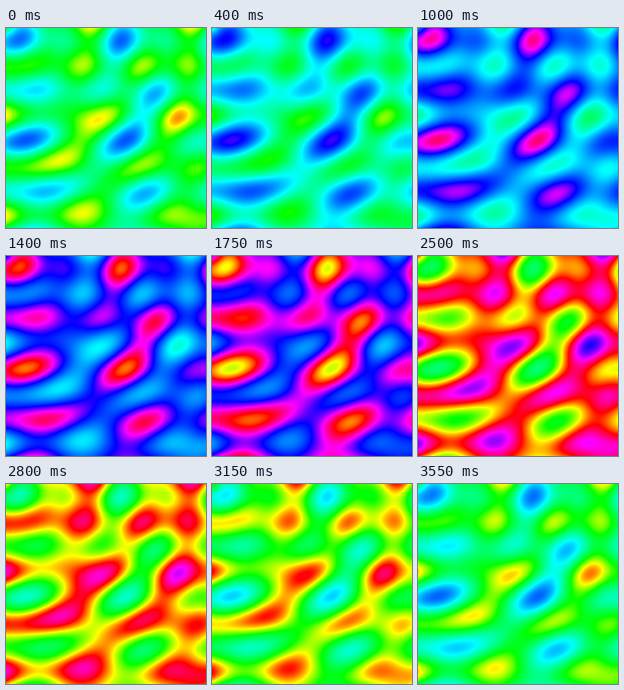
These frames come from a looping animation (200 px wide and 200 px high, 3.6 s). An HTML page with a canvas:

```html
<!DOCTYPE html>
<html>
<head>
<meta charset="utf-8">
<title>Plasma</title>
<style>
html, body { margin: 0; width: 100%; height: 100%; overflow: hidden; }
canvas { display: block; width: 200px; height: 200px; }
</style>
</head>
<body>
<canvas id="stage" width="200" height="200"></canvas>
<script>
const SIZE = 200, LOOP = 3600, STEP = 50;
const ctx = document.getElementById('stage').getContext('2d');
const image = ctx.createImageData(SIZE, SIZE);
const pixels = new Uint32Array(image.data.buffer);

// Wheel angles of red, yellow, green, cyan, blue, magenta and red again
const stops = [0, 45, 90, 180, 270, 315, 360];

function hueAt(angle) {
  let i = 0;
  while (angle >= stops[i + 1]) i++;
  return 60 * (i + (angle - stops[i]) / (stops[i + 1] - stops[i]));
}

function hueColor(hue) {
  const channel = shift => {
    const k = (shift + hue / 60) % 6;
    return Math.round(255 * (1 - Math.max(0, Math.min(k, 4 - k, 1))));
  };
  return (255 << 24 | channel(1) << 16 | channel(3) << 8 | channel(5)) >>> 0;
}

const WHEEL = 1440;
const wheel = Uint32Array.from({ length: WHEEL }, (_, i) => hueColor(hueAt(i * 360 / WHEEL)));

// Static plasma field, stored as wheel positions
const field = Uint16Array.from({ length: SIZE * SIZE }, (_, i) => {
  const x = i % SIZE, y = Math.floor(i / SIZE);
  const sum = Math.sin(x / 16) + Math.sin(y / 8) +
    Math.sin((x + y) / 16) + Math.sin(Math.hypot(x, y) / 8);
  return Math.round((5 + 30 * (sum + 4)) * WHEEL / 360);
});

function draw() {
  const step = Math.floor(performance.now() % LOOP / STEP);
  const shift = step * STEP / LOOP * WHEEL;
  for (let i = 0; i < pixels.length; i++) pixels[i] = wheel[(field[i] + shift) % WHEEL];
  ctx.putImageData(image, 0, 0);
  requestAnimationFrame(draw);
}
draw();
</script>
</body>
</html>
```
